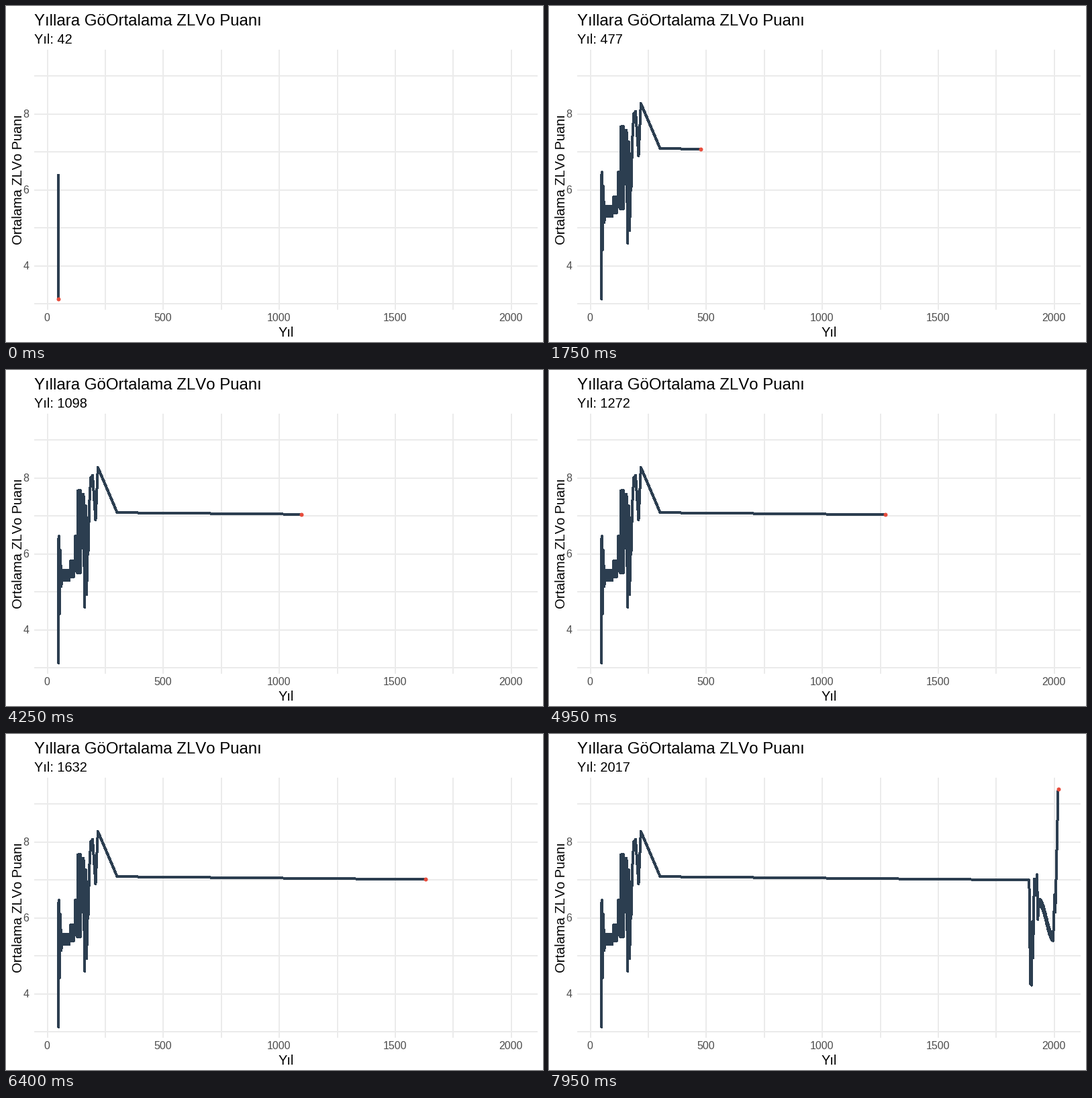
These frames come from a looping animation (800x500 px, 8 s). A matplotlib script:

```python
import numpy as np
import matplotlib.pyplot as plt
from matplotlib.animation import FuncAnimation

W, H, DPI = 800, 500, 100
PX = 72 / DPI
FRAMES, INTERVAL = 160, 50
FIRST, LAST = 42, 2017
STEP = (LAST - FIRST) / (FRAMES - 1)

# Panel edges in pixels, and the pixel scale of both axes
LEFT, RIGHT, TOP, BOTTOM = 41.5, 792, 64.5, 452
X0, Y3, X_UNIT, Y_UNIT = 61.58, 443.3, 0.34555, 56.5

plt.rcParams.update({"font.family": "Liberation Sans", "path.simplify": False,
                     "text.kerning_factor": 6})


def zigzag(start, stop, low, high):
    """Ratings that swing between two levels."""
    return [(y, high if i % 2 else low)
            for i, y in enumerate(range(start, stop, 2))]


def decline(start, stop, high, low, ripple=0.08):
    """Eased fall from high to low with a small yearly ripple."""
    years = np.arange(start, stop + 1)
    ease = (1 + np.cos(np.pi * (years - start) / (stop - start))) / 2
    return list(zip(years, low + (high - low) * ease + ripple * (-1.0) ** years))


rows = [(47, 6.42), (48, 3.13), (50, 6.47), (52, 4.42), (56, 6.1), (60, 5.14)]
rows += zigzag(62, 98, 5.3, 5.58)
rows += zigzag(98, 118, 5.4, 5.82)
rows += zigzag(118, 130, 5.55, 6.47)
rows += zigzag(130, 146, 5.5, 7.67)
rows += zigzag(146, 160, 6.15, 7.57)
rows += [(161, 4.6), (165, 7.27), (170, 4.93), (173, 6.95), (176, 6.0),
         (181, 7.3), (187, 8.0), (195, 8.07), (208, 6.9), (218, 8.28),
         (301, 7.09), (1892, 7.0), (1897, 4.28), (1903, 4.23), (1905, 5.9),
         (1908, 4.95), (1914, 7.03), (1920, 6.6), (1926, 7.14), (1929, 5.96)]
rows += decline(1936, 1996, 6.42, 5.48)
rows += [(2002, 6.62), (2004, 6.15), (2007, 6.7), (2017, 9.4)]

year, rating = np.array(rows, float).T
shown_at = np.round((year - FIRST) / STEP).astype(int)

fig = plt.figure(figsize=(W / DPI, H / DPI), dpi=DPI, facecolor="white")
ax = fig.add_axes([LEFT / W, 1 - BOTTOM / H, (RIGHT - LEFT) / W, (BOTTOM - TOP) / H])
ax.set_xlim((LEFT - X0) / X_UNIT, (RIGHT - X0) / X_UNIT)
ax.set_ylim(3 - (BOTTOM - Y3) / Y_UNIT, 3 + (Y3 - TOP) / Y_UNIT)
ax.axis("off")

grid = dict(color="#EBEBEB", lw=PX, zorder=0, antialiased=False, snap=False)
for x in range(0, 2001, 250):
    ax.axvline(x, **grid)
for y in range(3, 10):
    ax.axhline(y, **grid)


def label(x, y, text, size, color="black", **kw):
    return fig.text(x / W, 1 - y / H, text, size=size * PX, color=color,
                    va="baseline", rotation_mode="anchor", **kw)


label(42, 29, "Yıllara GöOrtalama ZLVo Puanı", 24)
subtitle = label(42, 56, "", 20)
label(417.5, 492, "Yıl", 20, ha="center")
label(24, 258, "Ortalama ZLVo Puanı", 20, ha="center", rotation=90)
for x in range(0, 2001, 500):
    label(X0 + x * X_UNIT - 0.5, 469, str(x), 16, "#4D4D4D", ha="center")
for y in (4, 6, 8):
    label(34.5, Y3 - (y - 3) * Y_UNIT + 5.5, str(y), 16, "#4D4D4D", ha="right")

line, = ax.plot([], [], color="#2C3E50", lw=3 * PX, antialiased=False,
                solid_capstyle="butt", solid_joinstyle="round", snap=False)
dot, = ax.plot([], [], "o", color="#E74C3C", ms=6 * PX, mew=0,
               antialiased=False, zorder=5, clip_on=False)


def update(frame):
    n = np.searchsorted(shown_at, frame, side="right")
    x, y = year[:n], rating[:n]
    if n < len(year):
        t = (frame - shown_at[n - 1]) / (shown_at[n] - shown_at[n - 1])
        if t > 0:
            x = np.append(x, year[n - 1] + t * (year[n] - year[n - 1]))
            y = np.append(y, rating[n - 1] + t * (rating[n] - rating[n - 1]))
    line.set_data(x, y)
    dot.set_data(x[-1:], y[-1:])
    subtitle.set_text(f"Yıl: {round(FIRST + frame * STEP)}")
    return line, dot, subtitle


anim = FuncAnimation(fig, update, frames=FRAMES, interval=INTERVAL,
                     repeat=True, repeat_delay=0)
plt.show()
```
